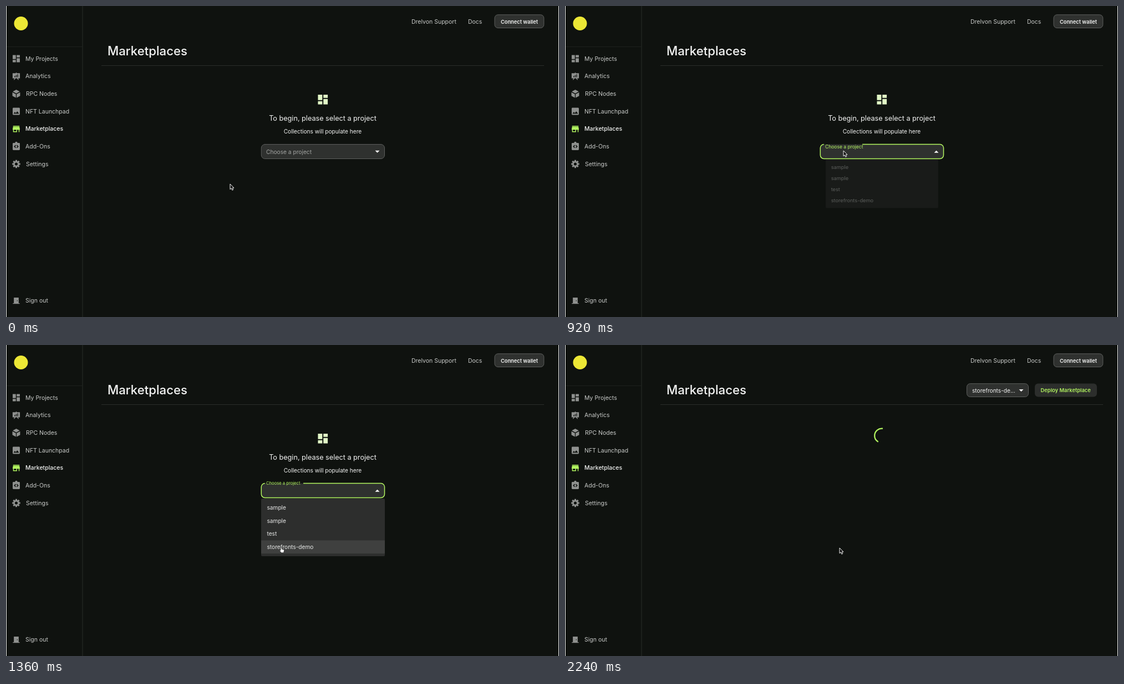
These frames come from a looping animation (997 by 561 pixels, 2760 ms). An HTML page:

```html
<!DOCTYPE html>
<html lang="en">
<head>
<meta charset="utf-8">
<title>Marketplaces</title>
<style>
  html, body { margin: 0; width: 100%; height: 100%; overflow: hidden; background: #0f120f; }
  svg { display: block; }
  text { font-family: Inter, "Liberation Sans", sans-serif; font-size: 10.5px; fill: #c9cbc9; white-space: pre; }
  .icon { fill: #8f918f; fill-rule: evenodd; }
  .on { fill: #b2f560; }
  .mid { text-anchor: middle; }
  .bright { fill: #f4f5f4; }
  .strong { font-weight: 600; }
  .box { fill: #2f312f; stroke: #5d5f5d; }
  .rule { fill: #2b2e2b; }
  #menu text { font-size: 10.15px; fill: #e9eae9; }
</style>
</head>
<body>
<svg width="997" height="561" viewBox="0 0 997 561">
  <rect width="997" height="561" fill="#0f120f"/>
  <rect width="1" height="561" fill="#f2f2f2"/>
  <rect x="996" width="1" height="561" fill="#f2f2f2"/>
  <rect class="rule" x="137.5" width="1" height="561"/>
  <rect x="1" y="73" width="137" height="1" fill="#1e211e"/>
  <rect class="rule" x="172" y="107" width="798" height="1"/>
  <circle cx="27" cy="31.5" r="12.5" fill="#ece735"/>
  <g id="nav"></g>

  <text x="731" y="32">Drelvon Support</text>
  <text x="833" y="32">Docs</text>
  <rect class="box" x="881" y="15.8" width="88.8" height="23.8" rx="6"/>
  <text class="mid bright strong" x="925.5" y="31.5" style="font-size:9.3px">Connect wallet</text>
  <text class="bright" x="183" y="89" style="font-size:22.2px;font-weight:500">Marketplaces</text>

  <g id="pick">
    <path id="tiles" class="icon" style="fill:#e1f8c6" transform="translate(559.5 157) scale(.98)"/>
    <text class="mid bright" x="571" y="207.3" style="font-size:12.65px">To begin, please select a project</text>
    <text class="mid bright" x="571" y="229.8" style="font-size:10.15px">Collections will populate here</text>
    <rect x="460.3" y="249.6" width="222.2" height="25.9" rx="6.5" fill="#2f312f"/>
    <path id="edge" fill="none"/>
    <path id="caret" d="M-4 -2h8l-4 4z" fill="#fff"/>
    <text id="label" style="font-size:10.2px">Choose a project</text>
    <g id="menu">
      <rect x="460" y="277" width="223" height="104" rx="2" fill="#2d2e2d"/>
      <rect id="hover" x="460" width="223" height="23.8" fill="#3f403f"/>
    </g>
  </g>

  <g id="loading">
    <rect class="box" x="724.5" y="69.7" width="111" height="23.8" rx="6"/>
    <text class="bright" x="734" y="85.7" style="font-size:10.15px">storefronts-de...</text>
    <path d="M-4 -2h8l-4 4z" fill="#fff" transform="translate(822.5 82)"/>
    <rect x="847" y="69.5" width="112" height="24" rx="6" fill="#2c2e2c"/>
    <text class="mid on strong" x="902.7" y="85.2" style="font-size:9.35px">Deploy Marketplace</text>
    <circle id="spinner" r="20.2" fill="none" stroke="#b2f560" stroke-width="3.6"/>
  </g>

  <path id="arrow" d="M0 0V10.4L2.4 8.3L4.1 12L6 11.1L4.4 7.6H7.4Z" fill="#111" stroke="#fff" stroke-width="1"/>
  <path id="hand" d="M3 .5C3.9 .5 4.2 1.1 4.2 1.8V4.6L7.2 5.3C8.2 5.5 8.6 6.1 8.5 7.1L7.9 10L7.3 11.6H3.4L.5 7.8C.1 7 1 6.3 1.6 6.9L2 7.3V1.8C2 1 2.2 .5 3 .5Z" fill="#fff" stroke="#111" stroke-width=".6"/>
</svg>
<script>
const LOOP = 2760, STEP = 40;
const OPEN = 857, SWITCH = 1880, SPIN = 1868;
const ROW_TOP = 281, ROW = 23.8;
const GREEN = '#b2f560';
const $ = id => document.getElementById(id);
const set = (el, attrs) => { for (const k in attrs) el.setAttribute(k, attrs[k]); };
const show = (el, on) => { el.style.display = on ? '' : 'none'; };
const clamp = v => Math.max(0, Math.min(1, v));
const mix = (a, b, p) => a + (b - a) * p;

function bezier(x1, y1, x2, y2) {
  const at = (a, b, u) => 3 * a * u * (1 - u) ** 2 + 3 * b * u * u * (1 - u) + u ** 3;
  return p => {
    if (p <= 0 || p >= 1) return clamp(p);
    let lo = 0, hi = 1;
    for (let i = 0; i < 24; i++) {
      const m = (lo + hi) / 2;
      if (at(x1, x2, m) < p) lo = m; else hi = m;
    }
    return at(y1, y2, lo);
  };
}
const easeOut = bezier(0, 0, .2, 1);
const easeMove = bezier(.4, 0, .2, 1);
const easeInOut = bezier(.42, 0, .58, 1);

// Icons live in a 24 unit box.
const icons = {
  tiles: 'M3 13h8V3H3zM3 21h8v-6H3zM13 21h8V11h-8zM13 3v6h8V3z',
  chart: 'M2 4h9V2h2v2h9v14h-5l2 4h-2l-3-4h-4l-3 4H5l2-4H2zM7 11v4h2v-4zM11 9v6h2V9zM15 7v8h2V7z',
  cube: 'M12 1L21.5 6L12 11L2.5 6zM1.5 8L11 13V23L1.5 18zM22.5 8L13 13V23L22.5 18z',
  image: 'M21 19V5c0-1.1-.9-2-2-2H5c-1.1 0-2 .9-2 2v14c0 1.1.9 2 2 2h14c1.1 0 2-.9 2-2zM8.5 13.5l2.5 3L14.5 12l4.5 6H5z',
  store: 'M20 4H4v2h16zM21 14v-2l-1-5H4l-1 5v2h1v6h10v-6h4v6h2v-6zM12 18H6v-4h6z',
  code: 'M5 3h4a3 3 0 0 1 6 0h4a2 2 0 0 1 2 2v14a2 2 0 0 1-2 2H5a2 2 0 0 1-2-2V5a2 2 0 0 1 2-2zM10 8L6 12l4 4 1.5-1.5L9 12l2.5-2.5zM14 8l4 4-4 4-1.5-1.5L15 12l-2.5-2.5z',
  gear: gear(),
  door: 'M5 3h14v16h3v2H2v-2h3zM14 11v2h2v-2z'
};

function gear() {
  const pts = [];
  for (let i = 0; i < 8; i++) {
    for (const [off, r] of [[-.3, 7.3], [-.2, 10.3], [.2, 10.3], [.3, 7.3]]) {
      const a = i * Math.PI / 4 + off;
      pts.push((12 + r * Math.sin(a)).toFixed(2) + ' ' + (12 - r * Math.cos(a)).toFixed(2));
    }
  }
  return 'M' + pts.join('L') + 'ZM12 8.4a3.6 3.6 0 1 0 0 7.2a3.6 3.6 0 1 0 0-7.2z';
}

const nav = [
  ['tiles', 'My Projects', 95], ['chart', 'Analytics', 126.6], ['cube', 'RPC Nodes', 158.3],
  ['image', 'NFT Launchpad', 190], ['store', 'Marketplaces', 221.7], ['code', 'Add-Ons', 253.4],
  ['gear', 'Settings', 285], ['door', 'Sign out', 531.7]
];
$('nav').innerHTML = nav.map(([icon, name, y]) => {
  const on = icon === 'store';
  const x = icon === 'cube' || icon === 'gear' ? 36 : 35;
  const s = icon === 'chart' || icon === 'cube' ? .66 : icon === 'door' ? .62 : .72;
  return `<path class="icon${on ? ' on' : ''}" d="${icons[icon]}" transform="translate(18.5 ${y}) scale(${s}) translate(-12 -12)"/>
    <text class="${on ? 'bright' : ''}" x="${x}" y="${y + 3.7}"${on ? ' style="font-weight:500"' : ''}>${name}</text>`;
}).join('');
$('tiles').setAttribute('d', icons.tiles);

['sample', 'sample', 'test', 'storefronts-demo'].forEach((name, i) => {
  const t = document.createElementNS('http://www.w3.org/2000/svg', 'text');
  set(t, { x: 470.5, y: 296.7 + i * ROW });
  t.textContent = name;
  $('menu').append(t);
});

// Pointer path: time, x, y
const path = [
  [520, 453, 281], [600, 479, 269], [720, 498, 262], [840, 502, 261], [1040, 502, 261],
  [1120, 503, 290], [1200, 502, 327], [1280, 499, 352], [1360, 497, 364],
  [1560, 496, 366], [1840, 496, 366], [1880, 495, 366]
];
function pointer(t) {
  if (t < path[0][0]) return [404, 321];
  for (let i = 1; i < path.length; i++) {
    const [t0, x0, y0] = path[i - 1], [t1, x1, y1] = path[i];
    if (t < t1) {
      const p = (t - t0) / (t1 - t0);
      return [mix(x0, x1, p), mix(y0, y1, p)];
    }
  }
  return path[path.length - 1].slice(1);
}

function drawField(t) {
  const open = t >= OPEN;
  const lift = easeOut(clamp((t - OPEN) / 200));
  set($('label'), {
    transform: `translate(469 ${mix(266.8, 252.2, lift)}) scale(${mix(1, .75, lift)})`
  });
  $('label').style.fill = open ? GREEN : '#a3a5a3';
  set($('edge'), {
    d: `M${open ? 536 : 466} 249.6H676a6.5 6.5 0 0 1 6.5 6.5V269a6.5 6.5 0 0 1-6.5 6.5H466.8a6.5 6.5 0 0 1-6.5-6.5V256.1a6.5 6.5 0 0 1 6.5-6.5`,
    stroke: open ? GREEN : '#5d5f5d',
    'stroke-width': open ? 1.5 : 1
  });
  set($('caret'), { transform: `translate(669.5 262.8) scale(1 ${open ? -1 : 1})` });
}

function drawMenu(t, y) {
  const grow = easeMove(clamp((t - OPEN) / 153));
  show($('menu'), t >= OPEN);
  set($('menu'), {
    opacity: easeMove(clamp((t - OPEN) / 215)),
    transform: `translate(571.5 277) scale(${mix(.75, 1, grow)} ${mix(.5625, 1, grow)}) translate(-571.5 -277)`
  });
  const row = Math.floor((y - ROW_TOP) / ROW);
  show($('hover'), row >= 0 && row < 4);
  set($('hover'), { y: ROW_TOP + row * ROW });
}

function drawSpinner(t) {
  const age = Math.max(0, t - SPIN) / 1400;
  const p = easeInOut(clamp(age * 2));
  set($('spinner'), {
    transform: `translate(571 163.5) rotate(${age * 360}) scale(.636)`,
    'stroke-dasharray': `${mix(1, 100, p)} 200`,
    'stroke-dashoffset': -15 * p
  });
}

function draw(t) {
  const [x, y] = pointer(t);
  const loading = t >= SWITCH;
  const overMenu = t >= OPEN && !loading && y > 277;
  show($('pick'), !loading);
  show($('loading'), loading);
  drawField(t);
  drawMenu(t, y);
  drawSpinner(t);
  show($('arrow'), !overMenu);
  show($('hand'), overMenu);
  set($('arrow'), { transform: `translate(${x} ${y}) scale(.94)` });
  set($('hand'), { transform: `translate(${x - 4} ${y}) scale(1 .92)` });
}

const start = performance.now();
function tick() {
  let t = (performance.now() - start) % LOOP;
  t = Math.min(2240, Math.floor(t / STEP) * STEP);
  draw(t);
  requestAnimationFrame(tick);
}
tick();
</script>
</body>
</html>
```
